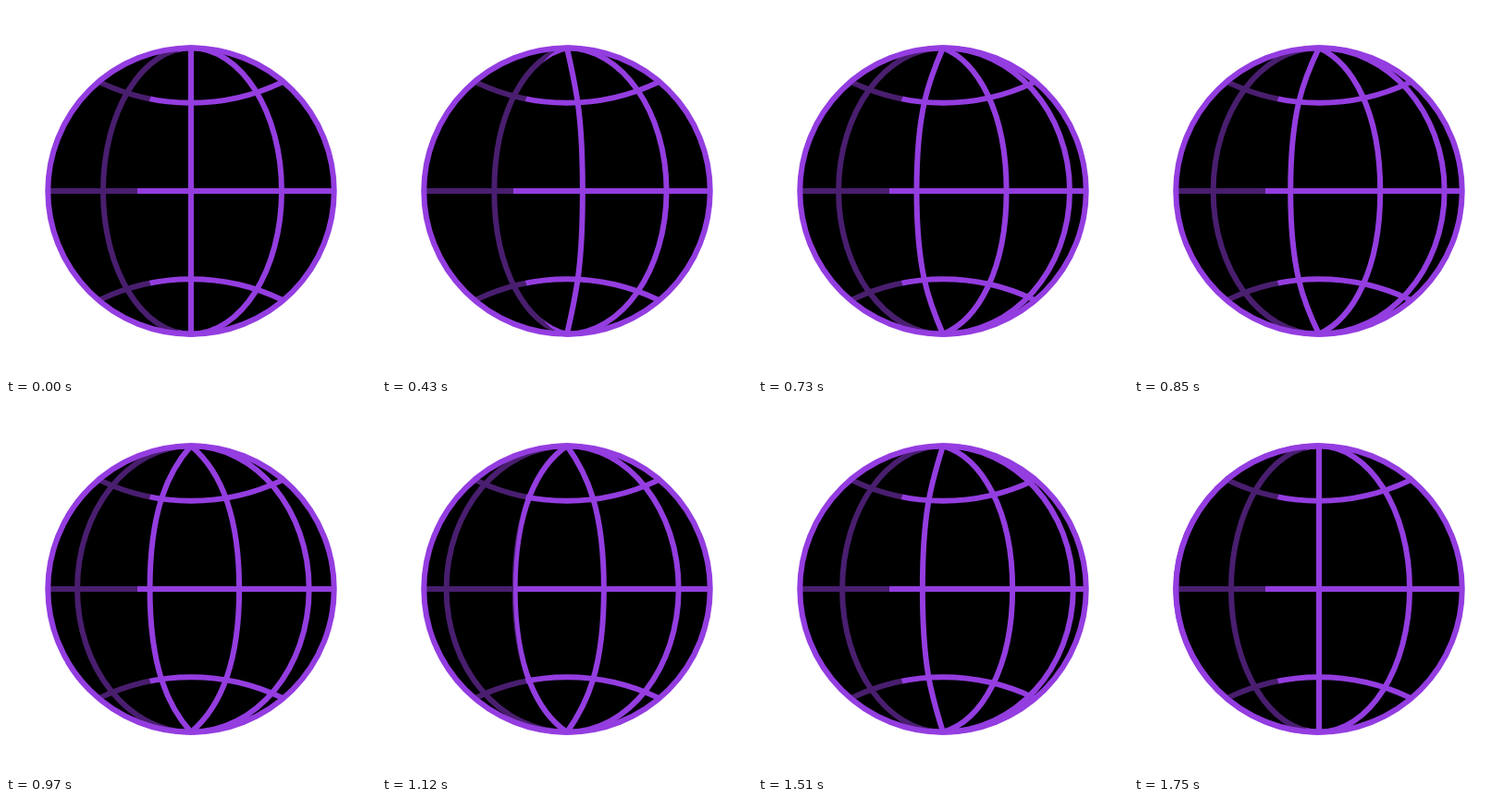
Write an HTML page that moves like this. It is 400x400 px and loops after 1.84 s.

```html
<!DOCTYPE html>
<html lang="en">
<head>
<meta charset="utf-8">
<title>Spinning globe</title>
<style>
  html, body { margin: 0; width: 100%; height: 100%; overflow: hidden; background: #fff; }
  svg { display: block; width: 100vw; height: 100vh; }
  .line { fill: none; stroke: #943de0; stroke-width: 6; }
</style>
</head>
<body>
<svg viewBox="0 0 400 400">
  <circle cx="200" cy="200" r="155" fill="#000"/>
  <g class="line">
    <path d="M45 200H355"/>
    <path d="M102 82.6A228 228 0 0 0 298 82.6"/>
    <path d="M102 317.4A228 228 0 0 1 298 317.4"/>
    <g id="meridians"></g>
  </g>
  <!-- shaded side -->
  <path d="M200 45A155 155 0 0 0 200 355A58 155 0 0 1 200 45Z" fill="#000" fill-opacity=".5"/>
  <circle class="line" cx="200" cy="200" r="154.7"/>
</svg>
<script>
  const LOOP = 1840, START = 430, END = 1750, STEP = 30;
  const RADIUS = 154.7, ROUND = 0.5523;
  // Signed half-widths a meridian passes through from left to right
  const SLOTS = [-154.7, -95, 0, 98, 153.7];
  // Time in ms, slots travelled, speed in slots per step
  const KEYS = [
    [430, 0.172, 0.2],
    [730, 2.7, 0.255],
    [970, 4.532, 0.195],
    [1270, 6.089, 0.118],
    [1510, 6.767, 0.058],
    [1750, 7, 0]
  ];

  const group = document.getElementById('meridians');
  const lines = SLOTS.slice(1).map(() =>
    group.appendChild(document.createElementNS('http://www.w3.org/2000/svg', 'path')));

  const mix = (a, b, f) => a + (b - a) * f;

  function travel(time) {
    if (time < START || time >= END) return 0;
    const t = START + Math.floor((time - START) / STEP) * STEP;
    const i = KEYS.findIndex(key => key[0] > t) - 1;
    const [t0, p0, v0] = KEYS[i], [t1, p1, v1] = KEYS[i + 1];
    const u = (t - t0) / (t1 - t0), w = 1 - u, n = (t1 - t0) / STEP;
    return w * w * (1 + 2 * u) * p0 + u * u * (3 - 2 * u) * p1
      + n * u * w * (w * v0 - u * v1);
  }

  // The pole handle points sideways on a curve and along the line when straight
  const poleHandle = width => width === 0 ? RADIUS / 3 : 0;

  function meridian(from, to, f) {
    const x = mix(from, to, f);
    const lift = mix(poleHandle(from), poleHandle(to), f);
    const poleX = 200 + x * ROUND, midX = 200 + x;
    const top = 200 - RADIUS, bottom = 200 + RADIUS, reach = RADIUS * ROUND;
    return `M200 ${top}C${poleX} ${top + lift} ${midX} ${200 - reach} ${midX} 200`
      + `C${midX} ${200 + reach} ${poleX} ${bottom - lift} 200 ${bottom}`;
  }

  function draw() {
    const time = performance.now() % LOOP;
    const phase = travel(time) % 1;
    lines.forEach((line, i) =>
      line.setAttribute('d', meridian(SLOTS[i], SLOTS[i + 1], phase)));
    // The next meridian enters one step after the spin begins
    lines[0].style.display = time < START + STEP ? 'none' : '';
    requestAnimationFrame(draw);
  }
  draw();
</script>
</body>
</html>
```
